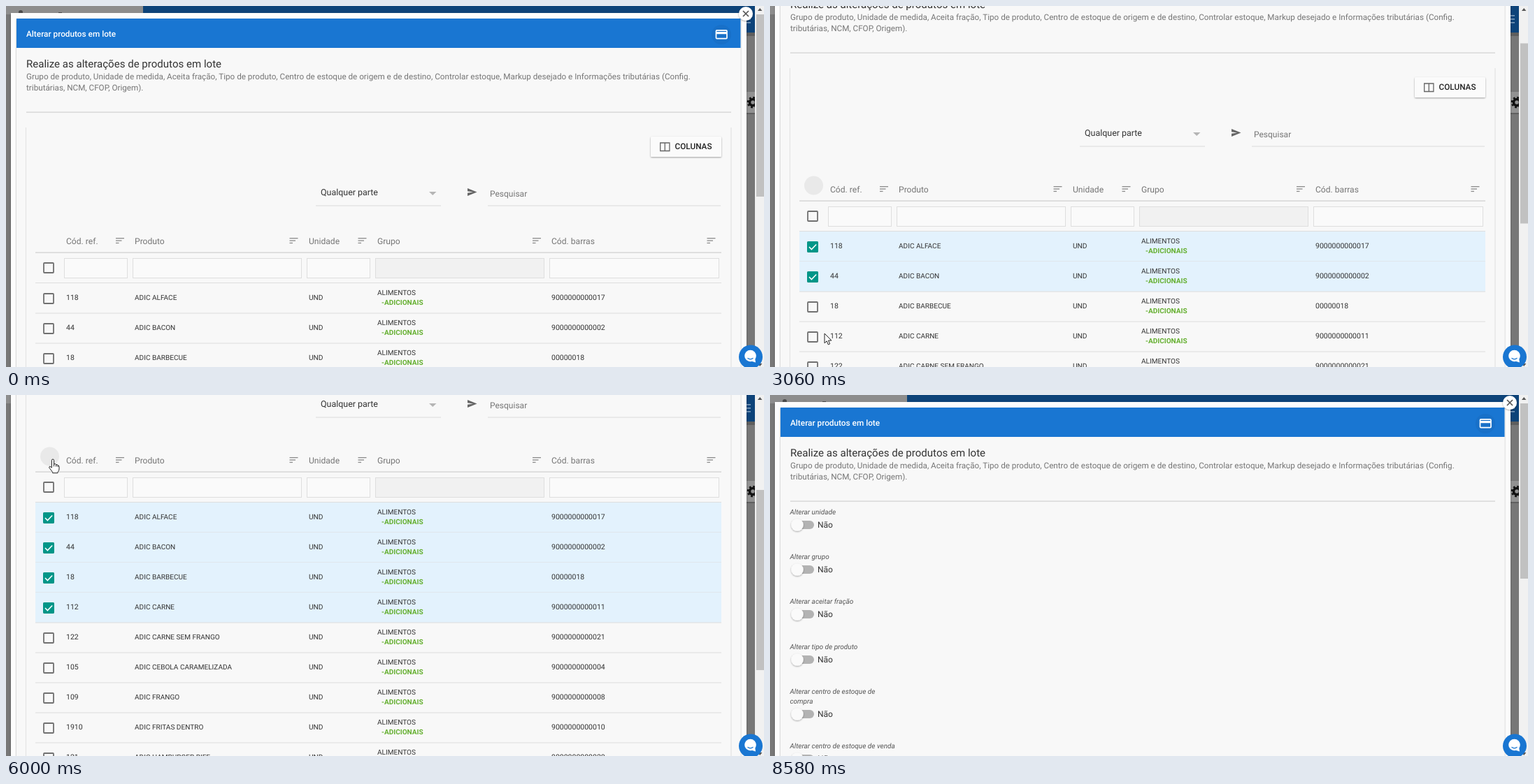
Write an HTML page that moves like this. It is 1084 by 517 pixels and loops after 8760 ms.

```html
<!DOCTYPE html>
<html lang="pt">
<head>
<meta charset="utf-8">
<style>
html, body { margin: 0; width: 100%; height: 100%; overflow: hidden; background: #777; }
svg { display: block; font-family: Roboto, Arial, sans-serif; text-rendering: geometricPrecision; }
</style>
</head>
<body>
<svg id="stage" width="1084" height="517" viewBox="0 0 1084 517"></svg>
<script>
const LOOP = 8760, STEP = 60, NOTCH = 84.5;

// Markup helpers
const rect = (x, y, w, h, fill, more = '') =>
  `<rect x="${x}" y="${y}" width="${w}" height="${h}" fill="${fill}" ${more}/>`;
const path = (d, more) => `<path d="${d}" ${more}/>`;
const circle = (x, y, r, fill, more = '') =>
  `<circle cx="${x}" cy="${y}" r="${r}" fill="${fill}" ${more}/>`;
const text = (x, y, size, fill, str, more = '') =>
  `<text x="${x}" y="${y}" font-size="${size}" fill="${fill}" ${more}>${str}</text>`;
const group = (id, body, more = '') => `<g id="${id}" ${more}>${body}</g>`;
const box = (x, y) => rect(x + 1, y + 1, 14, 14, 'none', 'rx="1" stroke="#707070" stroke-width="1.8"');

const products = [
  ['118', 'ALFACE', '9000000000017'],
  ['44', 'BACON', '9000000000002'],
  ['18', 'BARBECUE', '00000018'],
  ['112', 'CARNE', '9000000000011'],
  ['122', 'CARNE SEM FRANGO', '9000000000021'],
  ['105', 'CEBOLA CARAMELIZADA', '9000000000004'],
  ['109', 'FRANGO', '9000000000008'],
  ['1910', 'FRITAS DENTRO', '9000000000010'],
  ['121', 'HAMBURGER BIFE', '9000000000020']
];
// Title, text x, filter width, sort icon x
const columns = [
  ['Cód. ref.', 86, 91, 157],
  ['Produto', 184, 242, 405.5],
  ['Unidade', 433, 91, 503.5],
  ['Grupo', 531, 242, 753],
  ['Cód. barras', 780, 243, 1002.5]
];
const options = [
  ['Alterar unidade'], ['Alterar grupo'], ['Alterar aceitar fração'],
  ['Alterar tipo de produto'], ['Alterar centro de estoque de', 'compra'],
  ['Alterar centro de estoque de venda'],
  ['Alterar controle de estoque para', 'Produção/Venda'],
  ['Alterar markup desejado'], ['Alterar NCM'], ['Alterar CFOP']
];

function backdrop() {
  return rect(0, 0, 1084, 517, '#777') +
    rect(0, 0, 196, 12, '#8d8d8d') +
    circle(21, 9, 3, '#4a4a4a') + rect(75, 9, 5, 2, '#444') +
    rect(196, 0, 875, 38, '#0d4379') +
    [13, 18, 23].map(y => rect(1057, y, 8, 1.6, '#7f9cbb')).join('') +
    rect(1059, 38, 12, 5, '#5e5e5e') +
    rect(1059, 123, 12, 30, '#929292') + rect(1059, 153, 12, 2, '#606060') +
    circle(1068, 138, 4.5, 'none', 'stroke="#111" stroke-width="3.6"') +
    circle(1068, 138, 7, 'none', 'stroke="#111" stroke-width="2.6" stroke-dasharray="2.75"');
}

function modal() {
  return rect(7, 10, 1052, 1200, '#fcfcfc', 'filter="url(#soft)"') +
    rect(15, 18, 1035.5, 1200, '#f8f8f8', 'filter="url(#soft)"') +
    rect(15, 18, 1035.5, 42, '#1976d2') +
    text(29, 44, 11.8, '#fff', 'Alterar produtos em lote', 'font-weight="500"') +
    circle(1023, 41, 14, '#176bc0', 'opacity=".55"') +
    rect(1015.5, 34.8, 15.5, 11.8, 'none', 'rx="1.2" stroke="#fff" stroke-width="1.7"') +
    rect(1015, 37, 16, 3.2, '#fff') +
    text(29, 88, 15.05, '#333', 'Realize as alterações de produtos em lote') +
    text(29, 105, 11.7, '#757575', 'Grupo de produto, Unidade de medida, Aceita fração, Tipo de produto, ' +
      'Centro de estoque de origem e de destino, Controlar estoque, Markup desejado e Informações tributárias (Config.') +
    text(29, 121, 11.7, '#757575', 'tributárias, NCM, CFOP, Origem).') +
    rect(29, 151.3, 1008, 1.7, '#dcdcdc') +
    circle(1058, 11, 10, '#fff', 'filter="url(#soft)"') +
    path('M1054 7l8 8m0-8l-8 8', 'stroke="#555" stroke-width="1.7"');
}

function row([code, name, bar], i) {
  const y = Math.round(396.6 + 43.1 * i);
  const cell = (x, str, size = 10.5) => text(x, y + 24, size, '#333', str);
  return group('mark' + i, rect(42, y, 981, 43, '#e3f2fd')) +
    rect(42, y + 42.5, 981, 1, '#dedede') +
    box(53, y + 14) +
    group('tick' + i, rect(53, y + 14, 16, 16, '#009688', 'rx="2"') +
      path(`M56 ${y + 22}l3.4 3.6 6.8-7`, 'fill="none" stroke="#fff" stroke-width="1.5"')) +
    cell(86, code) + cell(184, 'ADIC ' + name, 10.05) + cell(433, 'UND', 10.2) + cell(780, bar) +
    text(531, y + 17, 10.05, '#333', 'ALIMENTOS') +
    text(537, y + 31, 10.05, '#66b032', '-ADICIONAIS', 'font-weight="700"');
}

function table() {
  const head = columns.map(([title, x, w, icon], i) =>
    text(x, 341, 12.1, '#757575', title) +
    [12, 8.5, 4.5].map((len, k) => rect(icon, 332 + 3.4 * k, len, 1.3, '#8c8c8c')).join('') +
    rect(x - 2.5, 361.5, w - 1, 28, i === 3 ? '#f1f1f1' : '#fafafa', 'stroke="#dedede"')).join('');
  return rect(28, 174, 1, 1100, '#e2e2e2') + rect(1036.5, 174, 1, 1100, '#dedede') +
    rect(922, 187, 101, 29, '#fbfbfb', 'rx="1.5" filter="url(#soft)"') +
    path('M935.7 196h13.2v11.5h-13.2zM942.3 196v11.5', 'fill="none" stroke="#666" stroke-width="1.3"') +
    text(956.5, 205, 11.75, '#222', 'COLUNAS', 'font-weight="500"') +
    text(450, 271, 12.45, '#333', 'Qualquer parte') +
    path('M605 266h10.5l-5.25 5z', 'fill="#b5b5b5"') +
    rect(443, 285.5, 179, 1, '#dcdcdc') +
    path('M660 261l13.5 5.5-13.5 5.5v-4.3l8-1.2-8-1.2z', 'fill="#666"') +
    text(692, 273, 12, '#757575', 'Pesquisar') +
    rect(689, 285.5, 333, 1, '#dcdcdc') +
    group('list', group('action', circle(62.5, 331, 13.5, '#e9e9e9')) + head +
      rect(42, 352.3, 981, 1.7, '#dadada') + box(53, 367) +
      rect(42, 396, 981, 1, '#dedede') + products.map(row).join(''));
}

function form() {
  let y = 171;
  return options.map(lines => {
    const labels = lines.map((s, k) =>
      text(28.5, Math.round(y + 14.4 * k), 10, '#555', s, 'font-style="italic"')).join('');
    y += 14.4 * (lines.length - 1);
    const mid = Math.round(y + 15);
    y += 64.2;
    return labels + rect(33, mid - 6, 30, 12, '#b3b3b3', 'rx="6"') +
      circle(39, mid, 8.8, '#fafafa', 'filter="url(#soft)"') +
      text(68, mid + 4, 12, '#333', 'Não');
  }).join('');
}

function overlay() {
  const ink = 'fill="#fff" stroke="#222" stroke-width="1" stroke-linejoin="round"';
  return rect(1071, 0, 13, 517, '#f1f1f1') +
    rect(1073, 12, 11, 261, '#c1c1c1', 'id="thumb"') +
    path('M1075 7l3.2-4 3.2 4z', 'fill="#555"') + path('M1075 512l3.2 4 3.2-4z', 'fill="#555"') +
    circle(1065, 502.5, 17, '#1976d2') +
    circle(1064.5, 501, 8.3, '#fff') + path('M1064 508l8 2.4-1-7z', 'fill="#fff"') +
    path('M1060.5 504.3q4 3 8 0', 'fill="none" stroke="#1976d2" stroke-width="1.2"') +
    group('cursor',
      group('arrow', path('M0 0v13.8l3.2-3 2.1 5.1 2.3-1-2.1-4.9h4.4z', ink)) +
      group('hand', path('M-1.6 12V1.6Q-1.6 0 0 0T1.6 1.6V7Q4.3 5.8 4.6 7.8 7 7 7.2 9' +
        'q1.8-.3 1.8 1.5V14q0 2.5-2 4.5v1.2H-.4v-1.3L-5 12.4q-.8-1.8.8-2.2z' +
        'M1.6 7v3.4M4.6 7.8v2.8M7.2 9v2', ink)));
}

const stage = document.getElementById('stage');
stage.innerHTML = `<defs><filter id="soft" x="-20%" y="-20%" width="140%" height="150%">
  <feDropShadow dx="0" dy="1" stdDeviation="1.2" flood-color="#000" flood-opacity=".36"/></filter></defs>` +
  backdrop() + group('page', modal() + group('table', table()) + group('form', form())) + overlay();

const el = id => document.getElementById(id);
const show = (id, on) => el(id).setAttribute('display', on ? 'inline' : 'none');
const move = (id, x, y) => el(id).setAttribute('transform', `translate(${x} ${y})`);
const ease = (t, a, b) => {
  const p = Math.min(1, Math.max(0, (t - a) / (b - a)));
  return p * p * (3 - 2 * p);
};

const checks = [1440, 2580, 4440, 5340], SWITCH = 6360;
// Start, end and direction of each wheel notch
const wheel = [[2940, 3060, 1], [3300, 3480, 1], [3480, 3660, 1],
  [6780, 6960, -1], [7080, 7260, -1], [7500, 7620, -1]];
// Pointer moves: start, end, x, y
const moves = [[180, 1020, 69, 414], [1080, 1260, 64, 418], [1500, 2100, 64, 469],
  [2580, 2820, 78, 469], [3600, 4140, 62, 261], [4440, 4920, 64, 304],
  [5400, 5940, 67, 92], [6780, 7440, 661, 156], [7680, 8520, 1084, 29]];
const handTimes = [[1140, 1560], [2040, 2640], [4200, 4500], [4800, 5460], [5940, 6420]];

function draw(t) {
  const scroll = Math.round(NOTCH * wheel.reduce((s, [a, b, dir]) => s + dir * ease(t, a, b), 0));
  const chosen = t >= checks[0], isForm = t >= SWITCH;
  move('page', 0, -scroll);
  move('list', 0, chosen ? 11 : 0);
  show('table', !isForm);
  show('form', isForm);
  show('action', chosen);
  products.forEach((_, i) => {
    show('mark' + i, t >= checks[i]);
    show('tick' + i, t >= checks[i]);
  });
  el('thumb').setAttribute('y', 12 + scroll * (isForm ? 0.47 : 0.488));
  el('thumb').setAttribute('height', isForm ? 251 : chosen ? 258 : 261);

  let x = 1084, y = 29;
  for (const [a, b, toX, toY] of moves) {
    const p = ease(t, a, b);
    x += (toX - x) * p;
    y += (toY - y) * p;
  }
  const isHand = handTimes.some(([a, b]) => t >= a && t < b);
  move('cursor', Math.round(x), Math.round(y));
  show('cursor', t >= 180 && t < 8520);
  show('hand', isHand);
  show('arrow', !isHand);
}

function tick() {
  const t = performance.now() % LOOP;
  draw(Math.floor(t / STEP) * STEP);
  requestAnimationFrame(tick);
}
tick();
</script>
</body>
</html>
```
